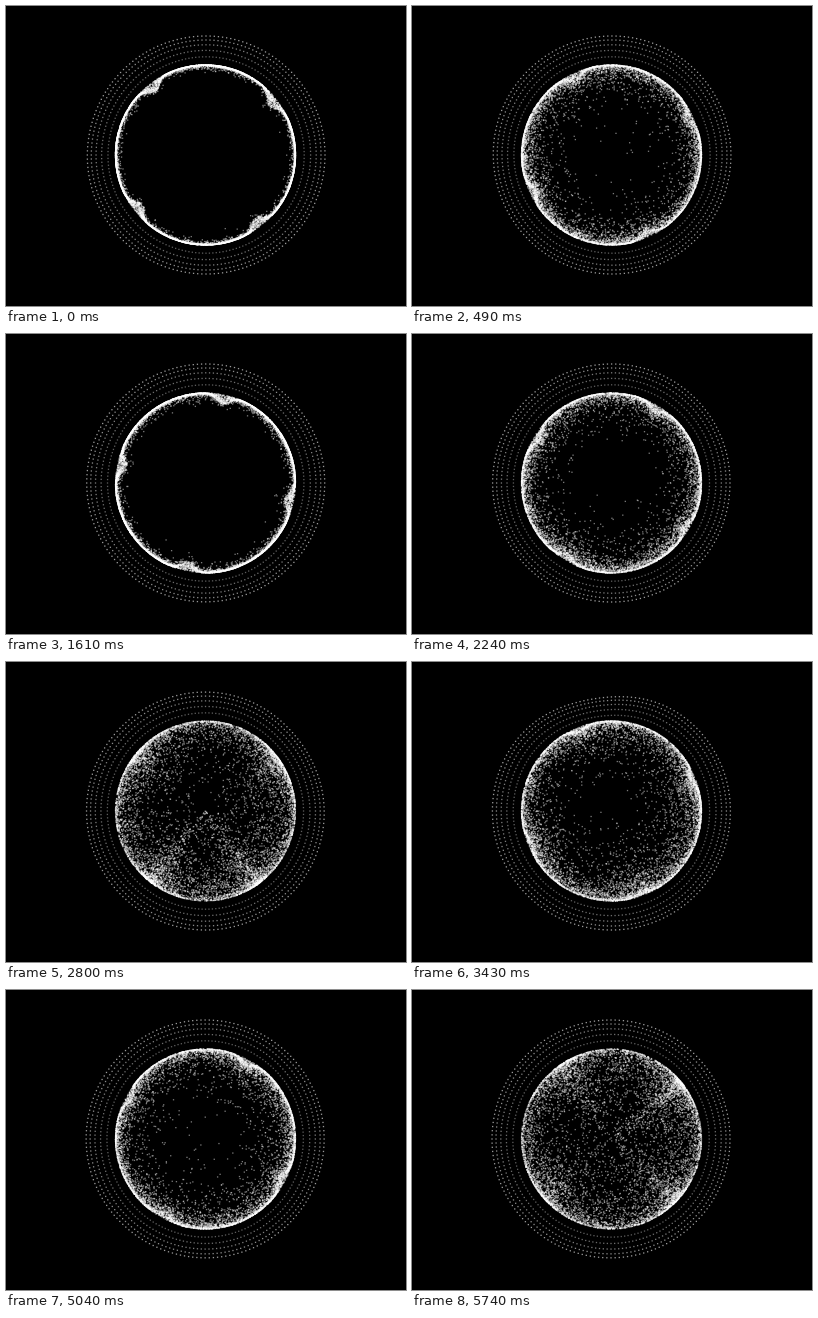
Write an HTML page with a canvas that moves like this. It is 400 by 300 pixels and loops after 5810 ms.

```html
<!DOCTYPE html>
<html lang="en">
<head>
<meta charset="utf-8">
<title>Particle ring</title>
<style>
  html, body { margin: 0; width: 100%; height: 100%; overflow: hidden; background: #000; }
  canvas { display: block; }
</style>
</head>
<body>
<canvas width="400" height="300"></canvas>
<script>
const ctx = document.querySelector('canvas').getContext('2d');
const LOOP = 5.81, STEP = 0.07, COUNT = 8500, RADIUS = 90;
const RAD = Math.PI / 180;
// Seconds at which the cloud is, in turn, drawn tight and fully spread.
const TURNS = [0, 0.98, 1.75, 2.8, 4.34, 5.81];

function seeded(seed) {
  return () => {
    seed = (seed + 0x6D2B79F5) | 0;
    let n = Math.imul(seed ^ (seed >>> 15), 1 | seed);
    n = (n + Math.imul(n ^ (n >>> 7), 61 | n)) ^ n;
    return ((n ^ (n >>> 14)) >>> 0) / 4294967296;
  };
}

const random = seeded(41);
const particles = Array.from({ length: COUNT }, () => ({
  angle: random() * 2 * Math.PI,
  depth: (-Math.log(1 - random())) ** 1.7,
  rank: random(),
  inner: Math.sqrt(random()),
  clump: random(),
}));

// 0 when the ring is tight, 1 when the cloud is fully spread.
function breath(time) {
  const next = TURNS.findIndex(turn => turn > time);
  const p = (time - TURNS[next - 1]) / (TURNS[next] - TURNS[next - 1]);
  const wave = 0.5 - 0.5 * Math.cos(Math.PI * (next % 2 ? p : 1 - p));
  return wave ** 1.5;
}

function dot(cx, cy, radius, angle, size) {
  ctx.fillRect(cx + radius * Math.cos(angle) - size / 2,
               cy + radius * Math.sin(angle) - size / 2, size, size);
}

function drawRings(time) {
  const cx = 200 - time / LOOP, cy = 149;
  const dent = 0.5 + 5 * Math.exp(-(((time - 3.4) / 0.6) ** 2));
  const dentAngle = (199 - 87 * time) * RAD;
  for (let ring = 0; ring < 5; ring++) {
    const radius = 119 - 3.6 * ring - 0.4 * ring * ring;
    ctx.fillStyle = `rgba(255,255,255,${0.6 - 0.06 * ring})`;
    for (let i = 0; i < 180; i++) {
      const angle = i * 2 * RAD;
      const facing = Math.cos(angle - dentAngle);
      const dip = dent * Math.exp(8 * (facing - 1)) * (1 - 0.12 * ring);
      dot(cx, cy, radius - dip, angle, 1.3);
    }
  }
}

function drawParticles(time) {
  const level = breath(time);
  const spread = 0.4 + 10 * level;
  const lobeAngle = (52 + 180 * time / LOOP) * RAD;
  const lobes = 0.55 * level;
  const clump = 10 * (1 - level);
  const lean = 0.7 * level * Math.exp(-time / 5);
  const leanAngle = (190 - 38 * time) * RAD;
  const share = 0.05 * level * (1.2 + Math.cos(2 * Math.PI * time / LOOP));

  ctx.fillStyle = 'rgba(255,255,255,.48)';
  for (const p of particles) {
    const base = p.angle + lobeAngle;
    const angle = base - lobes / 4 * Math.sin(4 * (base - lobeAngle))
                       - lean / 2 * Math.sin(base - leanAngle);
    const peak = Math.cos(2 * (angle - lobeAngle)) ** 20;
    const scale = spread * (1 + lean * Math.cos(angle - leanAngle));
    const depth = p.depth * scale + clump * p.clump * peak * peak;
    const rim = RADIUS * Math.exp(-depth / RADIUS);
    const inside = Math.min(1, Math.max(0, (share - p.rank) / 0.02));
    dot(199.5, 149, rim + (RADIUS * p.inner - rim) * inside, angle, 1.3);
  }
}

let start;
function frame(now) {
  start ??= now;
  const elapsed = ((now - start) / 1000) % LOOP;
  const time = Math.floor(elapsed / STEP) * STEP;
  ctx.fillStyle = '#000';
  ctx.fillRect(0, 0, 400, 300);
  drawRings(time);
  drawParticles(time);
  requestAnimationFrame(frame);
}
requestAnimationFrame(frame);
</script>
</body>
</html>
```
